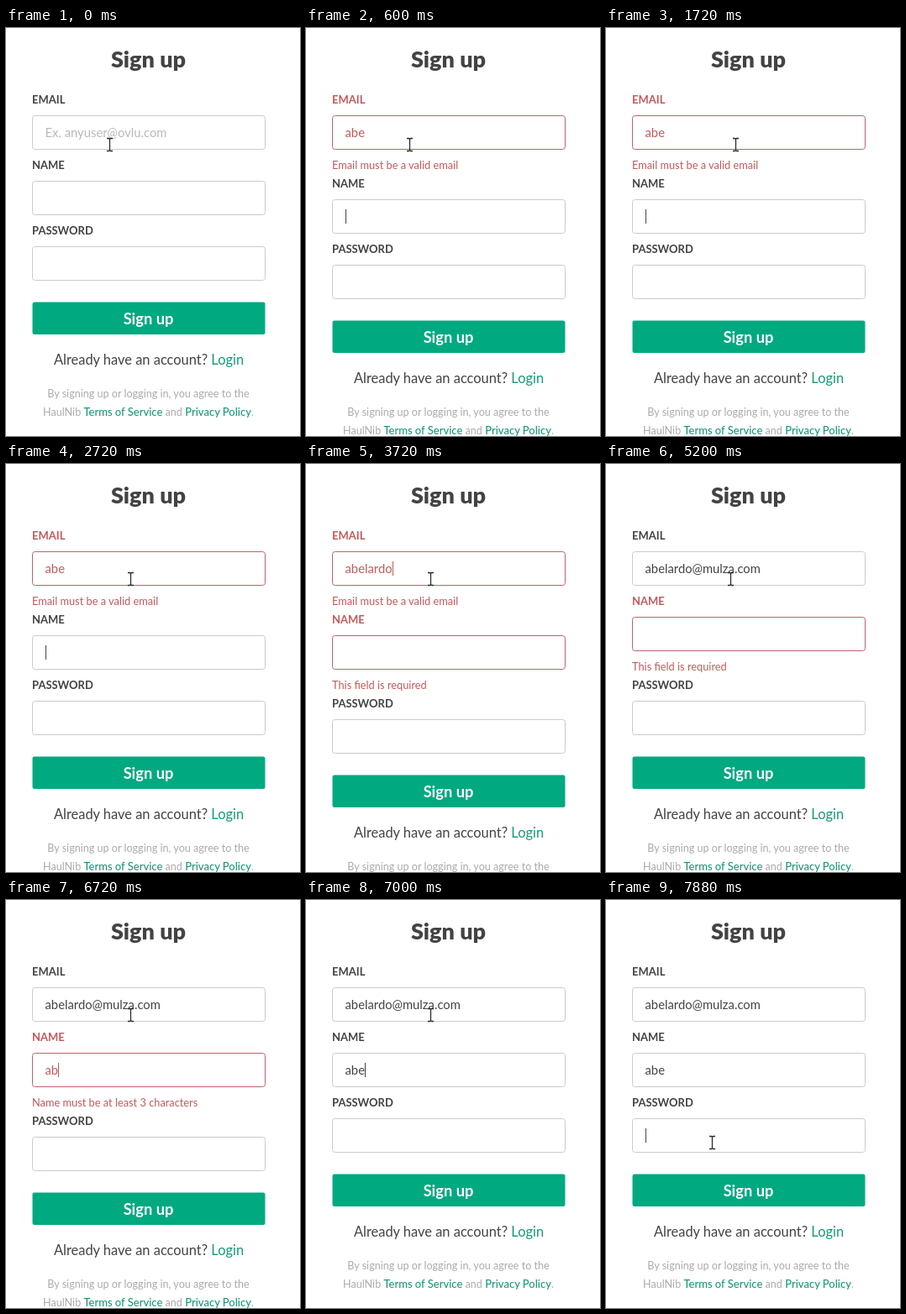
These frames come from a looping animation (350 by 486 pixels, 8000 ms). An HTML page:

```html
<!DOCTYPE html>
<html lang="en">
<head>
<meta charset="utf-8">
<title>Sign up</title>
<style>
  html, body { margin: 0; width: 100%; height: 100%; overflow: hidden; background: #fff; }
  svg { display: block; font: 12.8px Lato, sans-serif; fill: #434343; }
  .middle { text-anchor: middle; }
  .label { font-size: 13px; font-weight: 700; }
  .value { font-size: 14.8px; }
  .box { fill: #fff; stroke: #c9cccc; }
  .placeholder .value { fill: #b9b9b9; }
  .invalid { fill: #c4595c; }
  .invalid .box { stroke: #bf6169; }
  .link { fill: #179a79; }
  .legal { fill: #ababab; font-size: 12.6px; }
  .legal .link { font-size: 13px; font-weight: 500; }
</style>
</head>
<body>
<svg width="350" height="486" viewBox="0 0 350 486">
  <text class="middle" x="169.5" y="47" font-size="27" font-weight="900">Sign up</text>
  <g id="fields"></g>
  <g id="footer" class="middle">
    <rect x="31.5" y="326.5" width="277" height="38.5" rx="2.5" fill="#00a980"/>
    <text x="169.5" y="352.5" font-size="18.3" font-weight="700" fill="#fff">Sign up</text>
    <text x="170" y="401" font-size="16.45">Already have an account? <tspan class="link">Login</tspan></text>
    <g class="legal">
      <text x="169.5" y="440">By signing up or logging in, you agree to the</text>
      <text x="169.5" y="462">HaulNib <tspan class="link">Terms of Service</tspan> and <tspan class="link">Privacy Policy</tspan>.</text>
    </g>
  </g>
  <path id="pointer" d="M-3.5-7h2.5l1 1 1-1h2.5M0-6v13M-3.5 8h2.5l1-1 1 1h2.5" fill="none" stroke="#2b2b2b" stroke-width="1.3"/>
</svg>
<script>
const LOOP = 8000;
const FIELD_PITCH = 78, ERROR_HEIGHT = 22, TEXT_X = 46.5;
const PLACEHOLDER = 'Ex. anyuser@ovlu.com';
const USER = 'abelardo', ADDRESS = USER + '@mulza.com', NICK = 'abe';

const initial = { email: '', name: '', password: '', emailError: '', nameError: '', focus: 'email', caret: false };
const email = n => ({ email: ADDRESS.slice(0, n) });
const name = n => ({ name: NICK.slice(0, n) });
const blink = { caret: false };

// Every change shows the caret unless it is a blink.
const changes = [
  [120, email(1)], [320, email(2)], [400, email(3)],
  [600, { focus: 'name', emailError: 'Email must be a valid email' }],
  [920, blink], [1120, {}], [1400, blink], [1720, {}], [1920, blink], [2200, {}], [2400, blink], [2720, {}],
  [2800, { focus: 'email', nameError: 'This field is required' }],
  [3320, email(4)], [3400, email(5)], [3520, email(6)], [3600, email(7)], [3720, email(8)],
  [3920, blink], [4000, email(9)],
  [4320, email(10)], [4400, email(11)], [4520, email(12)], [4600, email(14)], [4720, email(15)],
  [4800, email(16)], [4920, { ...email(17), emailError: '' }], [5000, email(18)],
  [5200, blink], [5520, { focus: 'name' }], [5800, blink],
  [6000, { ...name(1), nameError: 'Name must be at least 3 characters' }],
  [6200, name(2)], [6520, blink], [6720, {}],
  [7000, { ...name(3), nameError: '' }],
  [7320, blink], [7600, {}], [7880, { focus: 'password' }],
];

// Pointer path: time, x, y
const path = [
  [0, 123, 139], [1300, 123, 139], [1700, 154, 139], [2100, 181, 140], [2300, 181, 140],
  [2400, 160, 137], [2500, 148, 137], [7500, 148, 137], [7600, 147, 146],
  [7700, 140, 205], [7800, 130, 268], [7880, 126, 289], [LOOP, 126, 289],
];

const $ = id => document.getElementById(id);

const fields = ['email', 'name', 'password'].map(key => {
  const group = document.createElementNS('http://www.w3.org/2000/svg', 'g');
  group.innerHTML = `
    <text class="label" x="31" y="90">${key.toUpperCase()}</text>
    <rect class="box" x="31.5" y="104.5" width="277" height="40" rx="3"/>
    <text class="value" x="${TEXT_X}" y="130"></text>
    <rect class="caret" y="116" width="1" height="17"/>
    <text class="error" x="31" y="168"></text>`;
  $('fields').append(group);
  const part = cls => group.querySelector('.' + cls);
  return { key, group, value: part('value'), caret: part('caret'), error: part('error') };
});

function stateAt(time) {
  const state = { ...initial };
  for (const [start, change] of changes)
    if (start <= time) Object.assign(state, { caret: true }, change);
  return state;
}

function pointerAt(time) {
  const step = time >= 7880 ? time : Math.floor(time / 100) * 100;
  const i = path.findIndex(([t]) => t > step);
  const [t0, x0, y0] = path[i - 1], [t1, x1, y1] = path[i];
  const k = (step - t0) / (t1 - t0);
  return [x0 + (x1 - x0) * k, y0 + (y1 - y0) * k].map(Math.round);
}

function draw(time) {
  const state = stateAt(time);
  let shift = 0;
  fields.forEach(({ key, group, value, caret, error }, i) => {
    const message = state[key + 'Error'] || '';
    const empty = key === 'email' && !state.email;
    group.setAttribute('transform', `translate(0 ${i * FIELD_PITCH + shift})`);
    group.classList.toggle('invalid', !!message);
    group.classList.toggle('placeholder', empty);
    value.textContent = empty ? PLACEHOLDER : state[key];
    error.textContent = message;
    const width = state[key] ? value.getComputedTextLength() : 0;
    caret.setAttribute('x', Math.round(TEXT_X + width));
    caret.style.display = state.caret && state.focus === key ? '' : 'none';
    if (message) shift += ERROR_HEIGHT;
  });
  $('footer').setAttribute('transform', `translate(0 ${shift})`);
  const [x, y] = pointerAt(time);
  $('pointer').setAttribute('transform', `translate(${x + 0.5} ${y - 0.5})`);
}

function tick() {
  draw(performance.now() % LOOP);
  requestAnimationFrame(tick);
}
tick();
</script>
</body>
</html>
```
